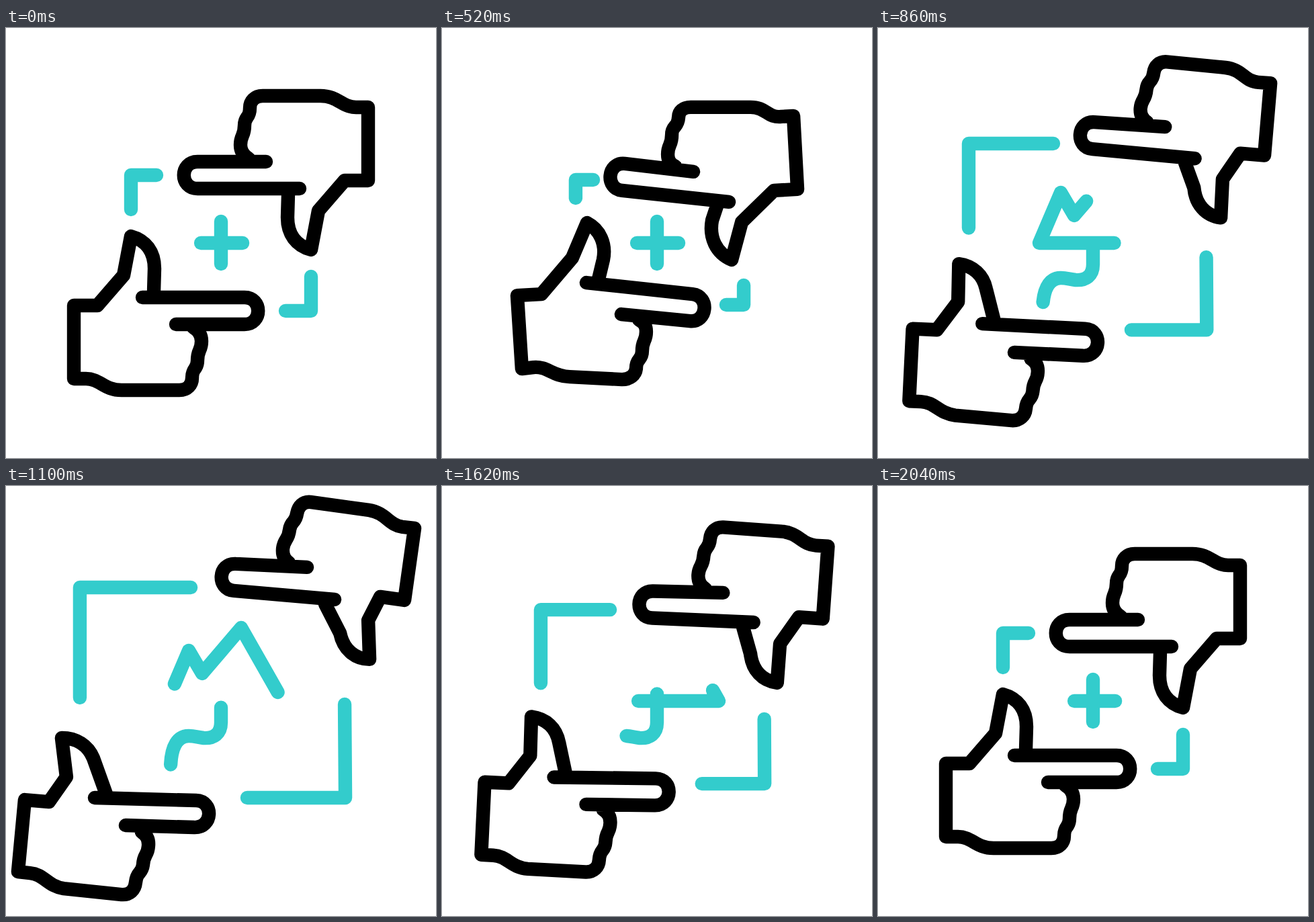
An HTML page that plays this animation: 640 by 640 pixels, repeating every 2400 ms.

```html
<!DOCTYPE html>
<html lang="en">
<head>
<meta charset="utf-8">
<title>Framing hands</title>
<style>
  html, body { margin: 0; width: 100%; height: 100%; overflow: hidden; background: #fff; }
  svg { display: block; width: 100%; height: 100%; }
  path { fill: none; stroke-width: 20.4; stroke-linecap: round; stroke-linejoin: round; }
  .teal { stroke: #3cc; }
  .ink { stroke: #000; }
</style>
</head>
<body>
<svg viewBox="0 0 640 640">
  <path id="curl" class="teal" d="M320 288 V352 C320 369 309 376 294 375 C285 374 281 372 272 372 C255 372 246 388 245 417"/>
  <path id="peaks" class="teal"/>
  <path id="cornerA" class="teal"/>
  <path id="cornerB" class="teal"/>
  <path id="handA" class="ink"/>
  <path id="handB" class="ink" transform="rotate(180 320 320)"/>
</svg>
<script>
const LOOP = 2400, END = 2040, IN = 340, OUT = 1205;
const $ = id => document.getElementById(id);

// Each shape has three poses: at rest, drawn together, spread apart.
const restHand =
  'M220 392 L221 358 C221 333 208 316 186 310 L175 368 L136 413 L101 413 L101 522 L119 522 ' +
  'C140 522 146 539 172 539 L258 539 C270 539 277 531 277 521 C277 505 285 509 285 495 ' +
  'C285 478 291 481 291 466 C291 456 286 450 279 446 ' +
  'M203 401 L355 401 C382 401 382 441 355 441 L253 441';

const poses = {
  handA: [restHand,
    'M233 374 L240 345 C245 321 235 300 216 290 L194 342 L148 396 L112 398 L119 507 L136 505 ' +
    'C157 503 164 518 190 519 L268 523 C280 523 288 516 289 507 C289 491 298 495 298 481 ' +
    'C298 464 304 467 304 452 C304 442 300 438 293 434 ' +
    'M215 379 L373 396 C399 399 395 439 369 436 L267 426',
    'M149 458 L130 405 C122 386 105 375 83 375 L90 433 L64 470 L28 467 L18 574 L36 576 ' +
    'C57 578 61 595 86 599 L172 608 C184 609 192 601 193 590 C195 573 202 578 204 564 ' +
    'C205 547 211 551 212 536 C213 526 209 519 202 515 ' +
    'M132 464 L283 468 C310 469 308 509 280 508 L178 505'],
  handB: [restHand,
    'M230 378 L238 354 C243 328 232 305 209 295 L194 351 L146 398 L111 400 L117 509 L135 508 ' +
    'C156 506 157 522 181 522 L270 522 C281 522 288 516 288 507 C289 491 298 495 298 481 ' +
    'C298 464 304 467 304 452 C304 442 300 438 293 434 ' +
    'M213 381 L372 398 C398 401 394 441 368 438 L266 426',
    'M165 464 L143 421 C138 397 121 382 99 382 L101 440 L83 475 L47 470 L32 577 L50 579 ' +
    'C71 582 74 600 100 604 L187 616 C198 617 205 610 207 599 C209 584 216 589 218 575 ' +
    'C220 558 226 562 228 547 C229 537 225 530 219 526 ' +
    'M151 471 L301 484 C327 486 325 526 298 524 L192 519'],
  cornerA: ['M224 219 L186 219 L186 270', 'M225 226 L199 226 L199 253', 'M275 151 L110 151 L110 315'],
  cornerB: ['M416 421 L454 421 L454 370', 'M423 412 L449 412 L449 383', 'M359 464 L505 464 L504 325']
};

const numbers = d => d.match(/\d+/g).map(Number);
const shapes = Object.entries(poses).map(([id, [rest, near, far]]) =>
  ({ el: $(id), rest, near: numbers(near), far: numbers(far) }));

function blend({ rest, near, far }, a, b) {
  let i = 0;
  return rest.replace(/\d+/g, n => {
    const v = +n + (near[i] - n) * a + (far[i] - n) * b;
    i++;
    return v.toFixed(2);
  });
}

const ease = (u, n) => u < .5 ? (2 * u) ** n / 2 : 1 - (2 - 2 * u) ** n / 2;

// Weights of the near and far poses; the hands swing slightly past both.
const PAST_NEAR = .0545, PAST_FAR = .014;
function weights(t) {
  if (t < IN) {
    const s = ease(t / IN, 2);
    return [(1 + PAST_NEAR) * s, -PAST_NEAR * s];
  }
  if (t < OUT) {
    const g = ease((t - IN) / (OUT - IN), 2.6) * (1 + PAST_NEAR + PAST_FAR) - PAST_NEAR;
    return [1 - g, g];
  }
  const s = 1 - ease((t - OUT) / (END - OUT), 3);
  return [-PAST_FAR * s, (1 + PAST_FAR) * s];
}

// Smooth curve through [time, value] keys without overshoot.
function track(keys) {
  const slope = i => (keys[i + 1][1] - keys[i][1]) / (keys[i + 1][0] - keys[i][0]);
  const tangent = i => {
    if (!i || i === keys.length - 1) return 0;
    const a = slope(i - 1), b = slope(i);
    return a * b > 0 ? 2 * a * b / (a + b) : 0;
  };
  return t => {
    if (t <= keys[0][0]) return keys[0][1];
    const i = keys.findIndex(k => k[0] >= t) - 1;
    if (i < 0) return keys[keys.length - 1][1];
    const [t0, v0] = keys[i], [t1, v1] = keys[i + 1];
    const d = t1 - t0, u = (t - t0) / d, w = 1 - u;
    return v0 * w * w * (1 + 2 * u) + v1 * u * u * (3 - 2 * u)
      + d * u * w * (tangent(i) * w - tangent(i + 1) * u);
  };
}

const head = track([[540, 457.7], [860, 656], [1100, 828], [1420, 956], [1560, 963.4]]);
const tail = track([[850, 395.7], [1100, 535], [1420, 719], [1620, 825], [END, 902.4]]);
const curlOut = track([[540, 0], [860, .94], [1100, .995], [1200, 1.01], [1420, .965], [1620, .51], [END, 0]]);

// The mountain outline is walked twice so the visible stretch can wrap round.
const outline = 'L240 320 L272 245 L292 279 L350 211 L412 320 ';
$('peaks').setAttribute('d', 'M240 320 ' + outline + outline + 'L240 320');
const curlLength = $('curl').getTotalLength() - 65;

function trim(el, from, to) {
  el.style.strokeDasharray = `${to - from} 5000`;
  el.style.strokeDashoffset = -from;
}

function draw(now) {
  const t = Math.min(now % LOOP, END);
  const [a, b] = weights(t);
  for (const s of shapes) s.el.setAttribute('d', blend(s, a, b));
  trim($('peaks'), tail(t), head(t));
  const q = curlOut(t);
  trim($('curl'), 42 * q, 63 + curlLength * q);
}

const start = performance.now();
function tick() {
  draw(performance.now() - start);
  requestAnimationFrame(tick);
}
tick();
</script>
</body>
</html>
```
